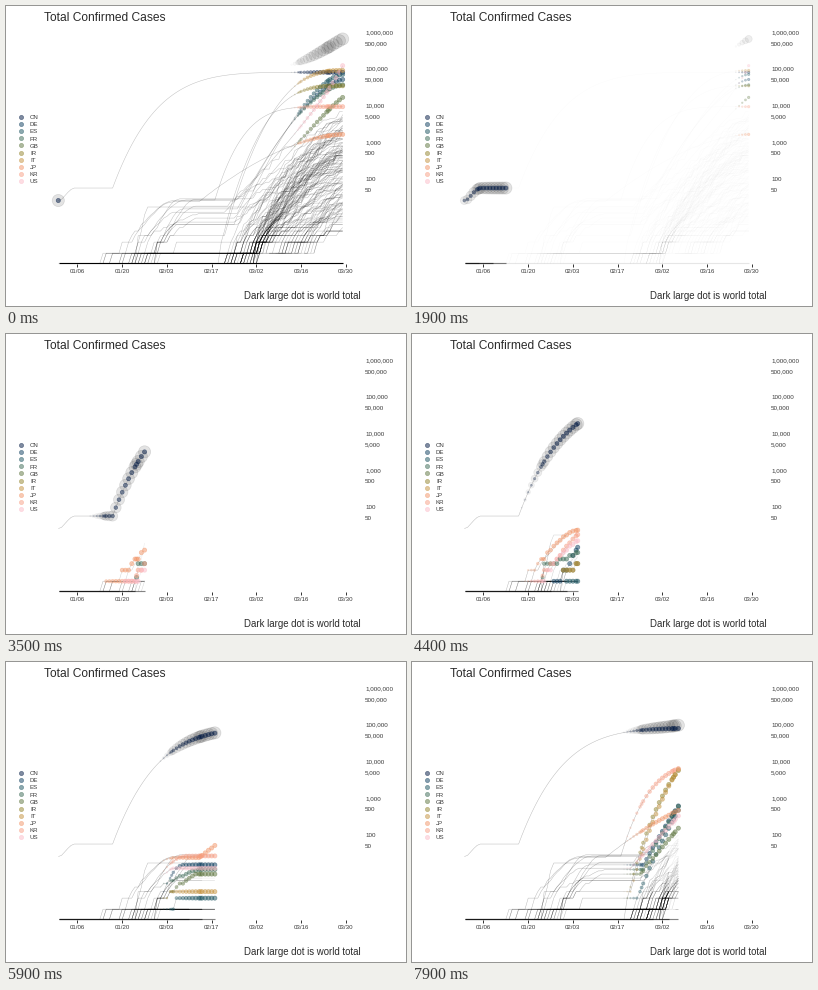
A matplotlib script for the animation above (8 s loop, 400 by 300 pixels).

```python
import numpy as np
import matplotlib.pyplot as plt
from matplotlib.animation import FuncAnimation
from matplotlib.collections import LineCollection
from matplotlib.colors import to_rgb

W, H, DPI = 400, 300, 100
PX = 72 / DPI
LAST = 89
WAKE = 20
HOLD = 5
FLOOR = 257.3
ALPHA = 0.5

plt.rcParams["font.family"] = "Liberation Sans"
rng = np.random.default_rng(12)

DAYS = np.arange(LAST + 1)
HALF = np.arange(2 * LAST + 1) / 2
# 90 days are stretched to 99 steps by nine half-day steps.
GAPS = (4, 14, 24, 35, 44, 55, 65, 75, 84)
STEPS = sorted([*DAYS, *(g + 0.5 for g in GAPS)])


def day_x(day):
    return 52.3 + 3.195 * np.asarray(day, float)


def count_y(n):
    return 247.2 - 36.8 * np.log10(n)


def cases(start, first, plateau, settle, takeoff, final, bend, noise=0):
    """Daily counts: smooth rise to a plateau, then an eased outbreak."""
    a, b, c = np.log10((first, plateau, final))
    t = np.clip((DAYS - start) / max(settle - start, 1), 0, 1)
    u = np.clip((DAYS - takeoff) / (LAST - takeoff), 0, 1)
    v = a + (b - a) * t * t * (3 - 2 * t) + (c - b) * (1 - (1 - u) ** bend)
    v += noise * rng.normal(0, 1, len(v)) * (u > 0)
    n = np.round(10 ** np.maximum.accumulate(np.maximum(v, 0)))
    n[DAYS < start] = 0
    return n


def heights(n, rises=True):
    """Stage height per half day; NaN before the line leaves the floor."""
    y = np.where(n > 0, count_y(np.maximum(n, 1)), FLOOR)
    first = int(np.argmax(n > 0))
    y[:max(first - rises, 0)] = np.nan
    return np.interp(HALF, DAYS, y)


# name, colour, then the arguments of cases()
COUNTRIES = (
    ("CN", "#021a44", 0, 27, 59, 5, 17, 82400, 5.4),
    ("DE", "#0f3f60", 28, 1, 16, 39, 56, 52500, 1.5),
    ("ES", "#1d5561", 32, 1, 2, 40, 54, 72200, 1.6),
    ("FR", "#3c6b56", 25, 3, 12, 46, 56, 37600, 1.66),
    ("GB", "#5f7640", 31, 2, 9, 44, 55, 17100, 1.1),
    ("IR", "#94852e", 51, 2, 2, 51, 51, 35400, 3.1),
    ("IT", "#c5933f", 31, 2, 3, 38, 52, 92500, 2.6),
    ("JP", "#f3976a", 15, 1, 25, 36, 44, 1690, 1.7),
    ("KR", "#f9a086", 20, 1, 28, 40, 49, 9580, 4.6),
    ("US", "#fcbcc8", 21, 1, 13, 37, 52, 124700, 0.85),
)
names = [row[0] for row in COUNTRIES]
colors = [to_rgb(row[1]) for row in COUNTRIES]
series = [cases(*row[2:]) for row in COUNTRIES]
tracks = [heights(n) for n in series]
world_y = heights(series[0] + cases(20, 4, 1000, 48, 50, 580000, 1.07))


def early_country():
    start = 14 + int(19 * rng.beta(1.6, 1.4))
    plateau = 10 ** rng.choice((0, 0, rng.uniform(0.3, 1.6)))
    return cases(start, 1, plateau, start + rng.integers(4, 20),
                 rng.integers(52, 62), 10 ** rng.uniform(2.2, 3.8),
                 rng.uniform(1, 2), 0.06)


def late_country():
    start = 63 - int(11 * rng.beta(1, 1.3))
    end = 10 ** np.clip(rng.normal(2.2, 0.8), 0.5, 3.7)
    return cases(start, 1, 1, start, 62 - rng.integers(0, 4), end,
                 rng.uniform(0.9, 2), 0.06)


def newcomer():
    start = 63 + int(18 * rng.random())
    return cases(start, 1, 1, start, start, 10 ** rng.uniform(0.4, 2), 1.2,
                 0.05)


everyone = (tracks + [heights(early_country()) for _ in range(27)]
            + [heights(late_country()) for _ in range(62)]
            + [heights(newcomer(), False) for _ in range(28)])
grid_x = day_x(HALF)


def paths(day):
    """All country lines revealed up to a day."""
    stop = int(2 * day) + 1
    out = []
    for y in everyone:
        start = int(np.argmax(~np.isnan(y)))
        if stop - start > 1:
            out.append(np.column_stack((grid_x[start:stop], y[start:stop])))
    return out


fig = plt.figure(figsize=(W / DPI, H / DPI), dpi=DPI, facecolor="white")
ax = fig.add_axes((0, 0, 1, 1))
ax.set(xlim=(0, W), ylim=(H, 0))
ax.axis("off")


def label(x, y, text, size, color="#3a3a3a", ha="left"):
    ax.text(x, y + 0.36 * size, text, fontsize=size * PX, color=color,
            ha=ha, va="baseline")


def dot_area(r):
    return (2 * r * PX) ** 2


label(37.7, 10.7, "Total Confirmed Cases", 12, "#2b2b2b")
label(354.5, 289.7, "Dark large dot is world total", 9.6, "#2b2b2b", "right")
for power in range(2, 7):
    for n in (10 ** power, 10 ** power // 2):
        label(359, count_y(n) - 0.8, f"{n:,}", 6.25)
for i, date in enumerate(("01/06", "01/20", "02/03", "02/17", "03/02",
                          "03/16", "03/30")):
    x = day_x(6 + 14 * i)
    ax.plot([x, x], [258, 260.8], color="#222222", lw=0.9 * PX,
            solid_capstyle="butt")
    label(x, 265.1, date, 6.2, ha="center")

# Translucent rims overlap the fill, which leaves a darker ring.
RIM = 0.7 * PX
for i, (name, color) in enumerate(zip(names, colors)):
    y = 110.9 + 7.12 * i
    ax.scatter([14.5], [y], s=dot_area(2.1), color=[(*color, ALPHA)], lw=RIM)
    label(24, y + 0.1, name, 6.1)

# Wake: a cubic fall-off over the last steps, wrapping past the start.
AGES = np.arange(WAKE)
FADE = 1 - (AGES / WAKE) ** 3
SHARE = FADE ** 2 / np.sum(FADE ** 2)
GROUPS = ((0, 4), (4, 9), (9, WAKE))


def line_layer():
    lines = LineCollection([], linewidths=0.5 * PX, zorder=2)
    ax.add_collection(lines)
    base, = ax.plot([], [], color="black", lw=1.15 * PX, zorder=2,
                    solid_capstyle="butt")
    return lines, base


def show_layer(layer, segments, day, share):
    lines, base = layer
    lines.set_segments(segments if share > 0 else [])
    lines.set_color([(0, 0, 0, 0.27 * share)])
    base.set_data([52.6, float(day_x(day))], [FLOOR, FLOOR])
    base.set_alpha(min(1, 1.6 * share))


def fill(scatter, rows):
    rows = np.array(rows)
    scatter.set_offsets(rows[:, :2])
    scatter.set_sizes(dot_area(rows[:, 2]))
    scatter.set_facecolors(rows[:, 3:])
    scatter.set_edgecolors(rows[:, 3:])


layers = [line_layer() for _ in range(len(GROUPS) + 1)]
halos = ax.scatter([], [], lw=RIM, zorder=3)
dots = ax.scatter([], [], lw=RIM, zorder=4)
full_paths = paths(LAST)


def draw(i):
    k = max(0, i - HOLD)
    show_layer(layers[0], full_paths, LAST, SHARE[k + 1:].sum())
    for layer, (a, b) in zip(layers[1:], GROUPS):
        day = STEPS[max(k - a, 0)]
        show_layer(layer, paths(day), day, SHARE[a:min(b, k + 1)].sum())

    halo_rows, dot_rows = [], []
    for age in AGES[::-1]:
        day, f = STEPS[(k - age) % len(STEPS)], FADE[age]
        x, h = float(day_x(day)), int(2 * day)
        halo_rows.append((x, world_y[h], 6.1 * f, 0.1, 0.1, 0.1, 0.12 * f))
        for y, color in zip(tracks, colors):
            if y[h] < 250:
                dot_rows.append((x, y[h], 2.1 * f, *color, ALPHA * f))
    fill(halos, halo_rows)
    fill(dots, dot_rows)
    return []


anim = FuncAnimation(fig, draw, frames=80, interval=100, repeat=True,
                     repeat_delay=0, init_func=lambda: draw(0), blit=False)
plt.show()
```
